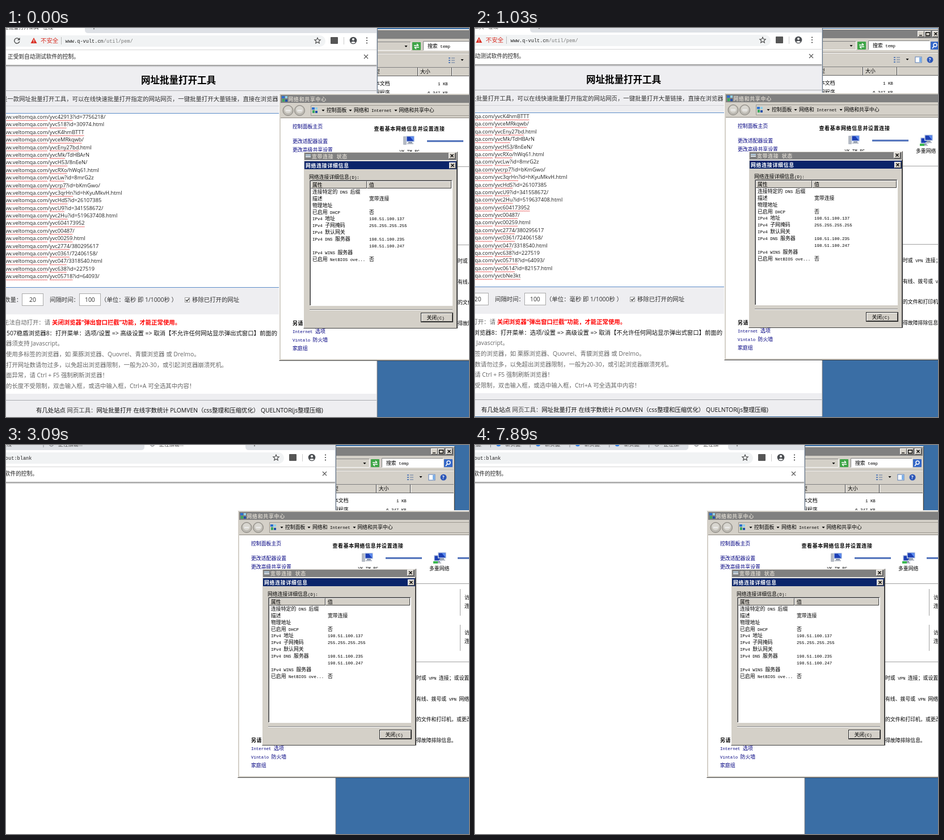
Animation of 816 by 686 pixels, one loop 8000 ms. Source, as an HTML page:

```html
<!DOCTYPE html>
<html lang="zh-CN">
<head>
<meta charset="utf-8">
<title>Desktop</title>
<style>
html, body { margin: 0; width: 100%; height: 100%; overflow: hidden; background: #3a6ea5; }
svg { display: block; }
#stage { width: 100vw; height: 100vh; }
text { white-space: pre; }
.sys { font: 8.9px "Noto Sans CJK SC", "Noto Sans CJK JP", sans-serif; }
.sys.b { font-weight: 700; letter-spacing: .74px; }
.mono { font-family: "Liberation Mono", monospace; font-size: 7.42px; }
.url { font: 8.65px "Liberation Mono", monospace; }
.page { font-family: "Open Sans", "Noto Sans CJK SC", "Noto Sans CJK JP", sans-serif; }
.row { font: 9.3px "Open Sans", "Noto Sans", sans-serif; fill: #222; }
.ui { font-family: "Noto Sans CJK SC", "Noto Sans CJK JP", sans-serif; }
</style>
</head>
<body>
<svg id="stage" viewBox="0 0 816 686">
  <defs>
    <pattern id="wave" width="3" height="2" patternUnits="userSpaceOnUse">
      <path d="M0 1.6L1.5 .4L3 1.6" fill="none" stroke="#e02020" stroke-width=".8"/>
    </pattern>
    <linearGradient id="shade" x2="0" y2="1">
      <stop stop-color="#8a8a8a"/><stop offset="1" stop-color="#8a8a8a" stop-opacity="0"/>
    </linearGradient>
  </defs>
  <g id="world"></g>
</svg>
<script>
const FACE = '#d4d0c8', NAVY = '#000080', PALE = '#eeeef1';
const $ = id => document.getElementById(id);

const rect = (x, y, w, h, fill, more = '') =>
  `<rect x="${x}" y="${y}" width="${w}" height="${h}" fill="${fill}" ${more}/>`;
const line = (d, stroke, width = 1) =>
  `<path d="${d}" fill="none" stroke="${stroke}" stroke-width="${width}"/>`;
const shape = (d, fill) => `<path d="${d}" fill="${fill}"/>`;
const disc = (x, y, r, fill, more = '') => `<circle cx="${x}" cy="${y}" r="${r}" fill="${fill}" ${more}/>`;

// Texts are placed by their left edge and vertical middle.
const sys = (x, y, s, fill = '#000', bold = false) =>
  `<text class="sys${bold ? ' b' : ''}" x="${x}" y="${y + 3.3}" fill="${fill}">` +
  s.replace(/[ -~]+/g, m => `<tspan class="mono">${m}</tspan>`) + '</text>';
const page = (x, y, s, fill = '#666', size = 10.38, weight = 400) =>
  `<text class="page" x="${x}" y="${y + size * .37}" fill="${fill}" font-size="${size}" font-weight="${weight}">${s}</text>`;
const ui = (x, y, s, size, fill = '#222') =>
  `<text class="ui" x="${x}" y="${y + size * .37}" font-size="${size}" fill="${fill}">${s}</text>`;

const box = (x, y, w, h, fill = FACE, raised = true) => rect(x, y, w, h, fill) +
  line(`M${x + .5} ${y + h - .5}v${1 - h}h${w - 1}`, raised ? '#fff' : '#808080') +
  line(`M${x + w - .5} ${y + .5}v${h - 1}h${1 - w}`, raised ? '#404040' : '#fff');
const button = (x, y, glyph) => box(x, y, 12, 11) + line(`M${x} ${y}` + glyph, '#000', 1.3);
const CROSS = 'm3.5 2.8l5 5m0 -5l-5 5';
const arrow = (x, y) => shape(`M${x - 2.5} ${y - 1}h5l-2.5 3z`, '#000');

const monitor = (x, y) => rect(x, y, 15, 11, '#c8d4e8', 'rx="1"') +
  rect(x + 1.5, y + 1.5, 12, 8, '#1c3fb4') + shape(`M${x + 7} ${y + 1.5}h6.5v8z`, '#5c8cf0') +
  rect(x + 4, y + 11, 7, 2, '#8a94a8') + rect(x + 2, y + 13, 11, 2, '#b8bec8');
const netIcon = (x, y) => rect(x, y, 5, 4, '#2c6fd0') + rect(x + 6, y, 4, 4, '#8fd0e8') +
  rect(x + 1, y + 5, 4, 5, '#3aa860') + rect(x + 6, y + 6, 4, 4, '#2450a8');
const link = (x1, x2) => rect(x1, 198, x2 - x1, 3, '#3558a8') + rect(x1, 199, x2 - x1, 1, '#7d9bd8');

function folder() {
  return box(600, 2, 264, 400) + rect(602, 4, 260, 15, '#808080') +
    button(822, 6, 'm3 8h5') + button(834, 6, 'm2.5 3h7v5.5h-7z') + button(848, 6, CROSS) +
    box(600, 24, 114, 16, FACE, false) + arrow(705, 32) +
    rect(716, 25, 15, 14, '#3fa548', 'rx="1"') +
    line('M719 31h8m-3 -3l3 3M728 34h-8m3 3l-3 -3', '#fff', 1.5) +
    box(735, 23, 109, 17, '#fff', false) + sys(743, 32, '搜索 temp') +
    rect(845, 25, 15, 14, '#3568c8', 'rx="1"') + disc(853, 31, 3, 'none', 'stroke="#fff" stroke-width="1.4"') +
    line('M851 33l-3 4', '#fff', 1.5) +
    line('M600 44.5h262', '#a8a49c') + line('M600 45.5h262', '#fff') +
    [0, 4, 8].map(d => rect(780, 52 + d, 3, 2, '#5b7fb8') + rect(785, 52 + d, 6, 2, '#9aa4b4')).join('') +
    arrow(804, 56) + rect(818, 52, 11, 10, '#fff', 'stroke="#5b7fb8"') + rect(825, 53, 4, 8, '#7fb0e8') +
    disc(844, 57, 5.5, '#2c56b8') + page(841.8, 57, '?', '#fff', 8, 700) +
    rect(600, 69, 262, 15, FACE) + line('M600 84.5h262', '#606060') + line('M600 69.5h262', '#808080') +
    line('M725.5 70v14M785.5 70v14', '#404040') + line('M726.5 70v14M786.5 70v14', '#fff') +
    sys(650, 77, '型') + sys(730, 77, '大小') + rect(600, 85, 262, 300, '#fff') +
    sys(650, 98, '本文档') + sys(761, 98, '1 KB') + sys(650, 114, '用程序') + sys(743, 114, '6,347 KB');
}

function browser() {
  const head = rect(-80, 0, 735, 686, '#fff') + '<g id="page">' + pageBody() + '</g>' +
    rect(-80, 9, 733, 57, '#fff') + '<g id="tabs"></g>' +
    rect(-70, 13, 633, 20, '#f1f3f4', 'rx="10"') +
    line('M23.2 20a4.6 4.6 0 1 0 .6 3.6', '#444', 1.4) + shape('M24.5 17v4.6h-4.6z', '#444') +
    '<g id="site">' + shape('M49 17l5.5 10h-11z', '#d93025') + rect(48.4, 20.5, 1.2, 3, '#fff') +
    rect(48.4, 24.4, 1.2, 1.2, '#fff') + ui(61, 22.5, '不安全', 10.4, '#d93025') +
    line('M97.5 16v13', '#bbb') +
    '<text class="url" x="104.5" y="25.5" fill="#222">www.q-vult.cn<tspan fill="#777">/util/pem/</tspan></text></g>' +
    '<g id="blank"><text class="url" x="61.5" y="26" fill="#222">about:blank</text></g>' +
    line('M549 17.2l1.5 3.4 3.7.3 -2.8 2.4 .9 3.6 -3.3 -1.9 -3.3 1.9 .9 -3.6 -2.8 -2.4 3.7 -.3z', '#444', 1.1) +
    rect(572, 16, 13, 12, '#555', 'rx="1"') + line('M595.5 16v13', '#ccc') +
    disc(612, 22, 6.3, '#4a4d51') + disc(612, 20, 2, '#fff') + shape('M608 25.5q4 -3.6 8 0q-4 3 -8 0z', '#fff') +
    [17.5, 22, 26.5].map(y => disc(636, y, 1.1, '#444')).join('') +
    line('M-80 38.5h733', '#d6d6d6') + ui(3, 50.5, '正受到自动测试软件的控制。', 9.7) +
    line('M631 47l7 7m0 -7l-7 7', '#555', 1.1) + rect(-80, 65, 733, 4, 'url(#shade)');
  return head + rect(653, 0, 1, 686, '#c9ccd1') + rect(654, 0, 1, 686, '#63758a');
}

function pageBody() {
  const field = (x, s, tx) => rect(x + .5, 468.5, 37, 21, '#fff', 'stroke="#aaa"') + page(tx, 479.5, s, '#333');
  return rect(-80, 66, 733, 439, PALE) + rect(-80, 645, 733, 41, PALE) +
    page(238, 92, '网址批量打开工具', '#000', 16.5, 700) +
    line('M-80 110.5h733M-80 656.5h733', '#a9abb0') + line('M-80 137.5h733', '#d3d4d8') +
    page(-8, 125, '是一款网址批量打开工具，可以在线快速批量打开指定的网站网页，一键批量打开大量链接，直接在浏览器', '#333') +
    rect(-80, 150.5, 700, 307, '#fff', 'stroke="#5b8cc8"') + '<g id="rows"></g>' +
    page(-3, 479, '数量：', '#333') + field(28, '20', 41) +
    page(77, 479, '间隔时间：', '#333') + field(129, '100', 139) +
    page(167, 479, '（单位：毫秒 即 1/1000秒 ）', '#333') +
    rect(315.5, 475.5, 8, 8, '#fff', 'stroke="#999"') + line('M317 479.5l2 2.2l3.6 -4.6', '#333', 1.5) +
    page(328, 479, '移除已打开的网址', '#333') +
    page(-5, 519.5, '无法自动打开：请') +
    page(81, 519.5, '关闭浏览器“弹出窗口拦截”功能，才能正常使用。', '#f00', 10.38, 700) +
    page(1, 538, '507稳盾浏览器8：打开菜单：选项/设置 =&gt; 高级设置 =&gt; 取消【不允许任何网站显示弹出式窗口】前面的', '#111') +
    ['器须支持 Javascript。',
     '使用多标签的浏览器，如 栗豚浏览器、Quovrel、青貘浏览器 或 Drelmo。',
     '打开网址数请勿过多，以免超出浏览器限制，一般为20-30，或引起浏览器崩溃死机。',
     '面异常，请 Ctrl + F5 强制刷新浏览器！',
     '的长度不受限制，双击输入框，或选中输入框，Ctrl+A 可全选其中内容！'
    ].map((s, i) => page(0, 556.5 + i * 18.6, s)).join('') +
    page(53, 674, '有几处站点 <tspan fill="#444">网页工具：</tspan>网址批量打开 在线字数统计 PLOMVEN（css整理和压缩优化） QUELNTOR(js整理压缩)', '#111');
}

function network() {
  const nav = x => disc(x, 145.5, 9, '#bcb9b2', 'stroke="#85827c"') + disc(x, 144, 6.5, '#d8d6d0') +
    line(`M${x - 4} 145.5h8`, '#eee', 2);
  return box(481, 115, 520, 472) + rect(484, 118, 510, 14, '#808080') + netIcon(486, 120) +
    sys(497.5, 125.5, '网络和共享中心', FACE, true) +
    nav(497) + nav(517.5) + line('M537.5 154.5v-18h460M537.5 154.5h460', '#9c9890') + netIcon(539, 140) +
    arrow(559, 145) + sys(565, 145, '控制面板') + arrow(607, 145) + sys(613, 145, '网络和 Internet') +
    arrow(687, 145) + sys(692.5, 145, '网络和共享中心') +
    rect(484, 159, 510, 425, '#fff') + line('M484 158.5h510', '#8c8880') +
    [['控制面板主页', 174], ['更改适配器设置', 200], ['更改高级共享设置', 215], ['Internet 选项', 535],
     ['Vintalo 防火墙', 550], ['家庭组', 565]].map(([s, y]) => sys(505, y, s, NAVY)).join('') +
    sys(505, 520.5, '另请参阅', '#000', true) + sys(648.5, 178, '查看基本网络信息并设置连接', '#000', true) +
    rect(700, 191, 6, 15, '#b4bac4', 'rx="1"') + monitor(705, 190) + sys(693.5, 217, 'VK-TM-PC') +
    link(742, 806) + monitor(827, 194) + monitor(834, 189) + shape('M826 205h8v4h-8z', '#3cb850') +
    sys(819, 217.5, '多重网络') + link(869, 930) +
    line('M780 244.5h200M780 382.5h200', '#a0a0a0') + line('M873.5 254v47M873.5 317v46', '#a0a0a0') +
    [269, 331].map(y => sys(881, y, '访问类型') + sys(881, y + 14.5, '连接')).join('') +
    ['时或 VPN 连接；或设置路由器', '有线、拨号或 VPN 网络连接', '的文件和打印机，或更改共享', '得故障排除信息。']
      .map((s, i) => sys(796, 411 + i * 36.4, s)).join('');
}

function dialogs() {
  const rows = [['连接特定的 DNS 后缀'], ['描述', '宽带连接'], ['物理地址'], ['已启用 DHCP', '否'],
    ['IPv4 地址', '198.51.100.137'], ['IPv4 子网掩码', '255.255.255.255'], ['IPv4 默认网关'],
    ['IPv4 DNS 服务器', '198.51.100.235'], ['', '198.51.100.247'], ['IPv4 WINS 服务器'],
    ['已启用 NetBIOS ove...', '否']];
  return box(524, 218, 272, 312) + rect(526, 220, 268, 13, '#808080') +
    rect(528, 223, 9, 2, '#b8d4e8') + rect(528, 226, 9, 2, '#dfe8f0') +
    sys(539, 226.5, '宽带连接 状态', FACE, true) + button(780, 220, CROSS) +
    box(524, 233, 271, 297) + rect(526, 235, 268, 14, '#0a246a') +
    sys(528, 242.5, '网络连接详细信息', '#fff', true) + button(781, 237, CROSS) +
    sys(534, 262.5, '网络连接详细信息(D):') +
    box(535, 268, 252, 222, '#fff', false) + line('M536.5 489v-219.5h249', '#404040') +
    box(537, 270, 99, 13) + box(636, 270, 149, 13) + sys(540, 276.5, '属性') + sys(640, 276.5, '值') +
    rows.map(([k, v = ''], i) => sys(540, 288.5 + i * 11.9, k) + sys(640, 288.5 + i * 11.9, v)).join('') +
    line('M535 496.5h252', '#808080') + line('M535 497.5h252', '#fff') +
    rect(731, 502, 57, 17, '#222') + box(732, 503, 55, 15) + sys(741.5, 510.5, '关闭(C)');
}

$('world').innerHTML = rect(-80, -10, 1000, 720, '#3a6ea5') + folder() + browser() + network() + dialogs();

// Typed address list
const HOST = 'www.veltomqa.com/', ROWS = 23;
const list = ('42913?id=7756218/ 518?id=30974.html K4hmBTTT eMRkqwb/ Eny27bd.html Mk/TdHBArN H53/8nEeN/ ' +
  'RXo/hWq61.html Lw?id=8mrG2z rp7?id=bKmGwo/ 3qrHn?id=hKyuMkvH.html HdS?id=26107385 U9?id=341558672/ ' +
  '2Hu?id=519637408.html 604173952 00487/ 00259.html 2774/380295617 0361/72406158/ 047/3318540.html ' +
  '638?id=227519 05718?id=64093/ 0614?id=82157.html bNe3kt 74wkd2/ rkp?id=61840/ 0573/29415')
  .split(' ').map(s => HOST + 'yvc' + s);
const all = list.join('\n');
const at = (n, chars = 0) => list.slice(0, n).join('\n').length + 1 + chars;

$('rows').innerHTML = Array.from({ length: ROWS }, (_, i) =>
  `<g transform="translate(0 ${(160 + i * 13.39).toFixed(2)})"><text class="row"></text>` +
  rect(0, 2, 0, 2, 'url(#wave)') + rect(77, 2, 0, 2, 'url(#wave)') + rect(0, -9, 0, 11, '#000') + '</g>').join('');
const rows = [...$('rows').children];
let hostW = 0;

function setRow(g, s, current) {
  const [label, host, word, caret] = g.children;
  const [, a, b, c] = s.match(/^([^/]*\/?)(\w*)(.*)$/);
  label.innerHTML = `${a}<tspan>${b}</tspan>${c}`;
  label.setAttribute('x', 77 - hostW);
  host.setAttribute('x', 77 - hostW);
  host.setAttribute('width', a === HOST ? hostW - 4 : 0);
  word.setAttribute('width', b && (!current || c) ? label.firstElementChild.getComputedTextLength() : 0);
  caret.setAttribute('x', 77.5 - hostW + (s ? label.getComputedTextLength() : 0));
  caret.setAttribute('width', current ? 1 : 0);
}

let typed = -1;
function type(count) {
  if (count === typed) return;
  typed = count;
  if (!hostW) {
    const probe = rows[0].firstChild;
    probe.textContent = HOST;
    hostW = probe.getComputedTextLength();
  }
  const shown = all.slice(0, count).split('\n').slice(-ROWS);
  rows.forEach((g, i) => setRow(g, shown[i], i === ROWS - 1));
}

// Tab strip
const OPENS = [2380, 2940, 3630, 4980, 5650, 6310, 6860];
const LEFT = -39, FULL = 178, STRIP = 558;
let tabState = '';
function tabs(t) {
  const n = OPENS.reduce((sum, o) => sum + (t < o ? 0 : t < o + 140 ? .6 : 1), 1);
  const loaded = Math.max(0, Math.floor((t - 4700) / 750) + 1);
  const state = n + '/' + loaded;
  if (state === tabState) return;
  tabState = state;
  const w = Math.min(FULL, STRIP / n), last = Math.ceil(n) - 1, end = LEFT + n * w;
  let out = rect(-80, 0, 733, 9, '#dee1e6');
  for (let i = 0; i <= last; i++) {
    const x = LEFT + i * w, width = Math.min(w, end - x), ready = i && i <= loaded;
    if (i === last) out += shape(`M${x - 6} 9q6 0 6 -6V0H${end}V3q0 6 6 6z`, '#fff');
    else if (i) out += line(`M${x} 0v4`, '#85898f');
    if (ready) out += disc(x + 14, -1.5, 4, '#2f80e8');
    else if (i) out += disc(x + 14, -1.5, 3.5, 'none', 'stroke="#8a8d92" stroke-width="1.3"');
    const name = !i ? '网址批量打开工具 - 在线' : ready ? '新页面资料' : '正在加载...';
    out += `<svg x="${x + 26}" width="${Math.max(0, width - 42)}" height="9">${ui(0, -1.3, name, 8.9, '#444')}</svg>`;
  }
  $('tabs').innerHTML = out + line(`M${end + 16} -4v6.5M${end + 13} -1h6`, '#555', 1.2);
}

// Timeline
const TICKS = [0, 150, 300, 440, 590, 720, 880, 1030, 1180, 1300, 1450, 1580, 1720, 1870, 1990, 2110];
const PAN = [[0, 0], [440, -8], [720, -22], [1300, -59], [1720, -73]];
const TYPE = [[0, at(22)], [720, at(23)], [1300, at(24, 23)], [1720, at(25, 22)], [2110, at(26, 10)]];

function mix(keys, t) {
  const i = keys.findIndex(k => k[0] > t);
  if (i < 0) return keys[keys.length - 1][1];
  const [t0, a] = keys[i - 1], [t1, b] = keys[i];
  return a + (b - a) * (t - t0) / (t1 - t0);
}

function draw(now) {
  const t = now % 8000, step = TICKS.filter(k => k <= t).pop();
  const blank = t >= OPENS[0], lift = step > 440 && step < 1180 ? -1 : 0;
  $('world').setAttribute('transform', `translate(${Math.round(mix(PAN, step))} ${lift})`);
  $('page').style.display = $('site').style.display = blank ? 'none' : '';
  $('blank').style.display = blank ? '' : 'none';
  if (!blank) type(Math.round(mix(TYPE, step)));
  tabs(t);
  requestAnimationFrame(draw);
}
requestAnimationFrame(draw);
</script>
</body>
</html>
```
